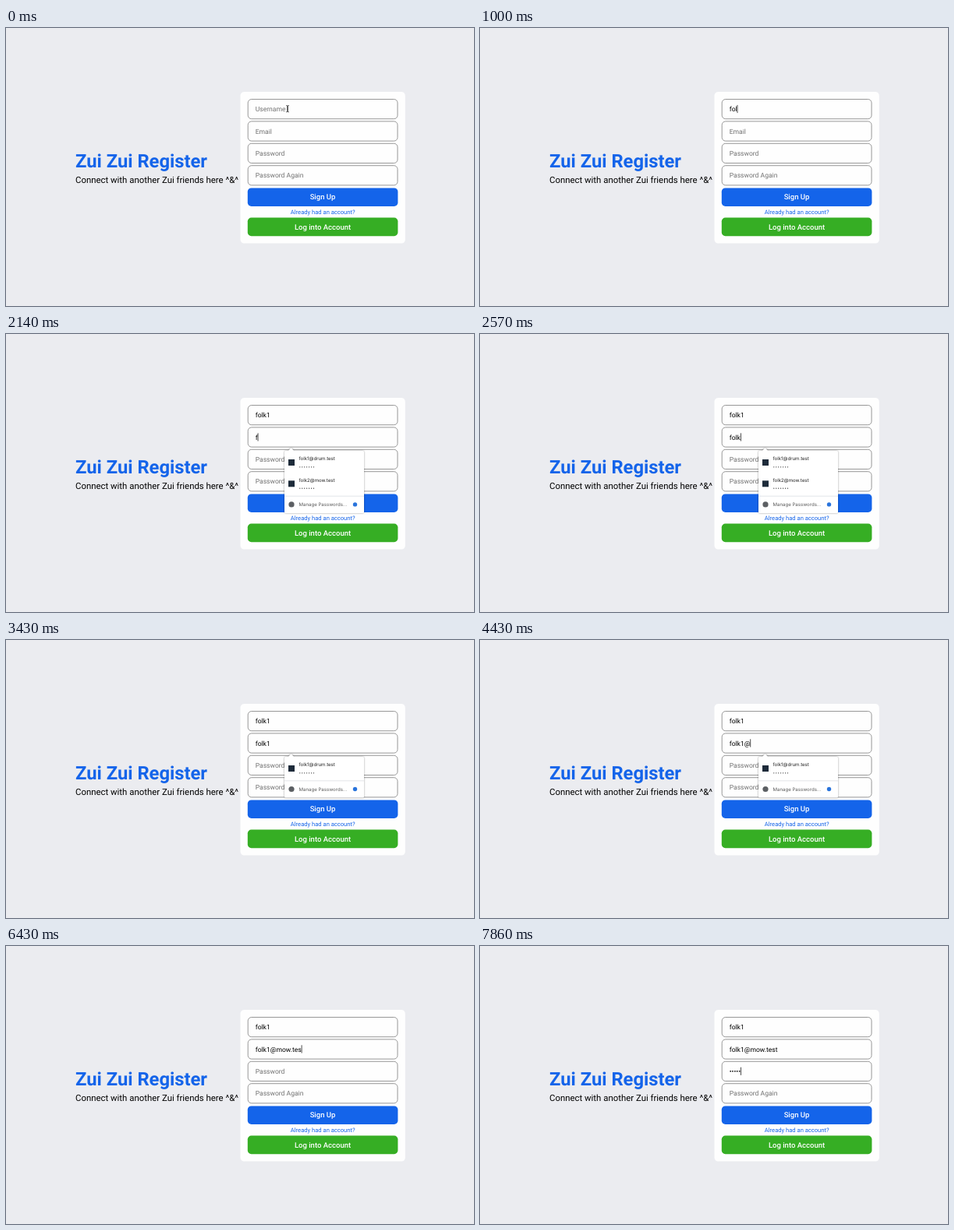
An HTML page that plays this animation: 600 px wide and 357 px high, repeating every 8 s.

```html
<!DOCTYPE html>
<html lang="en">
<head>
<meta charset="utf-8">
<title>Register form</title>
<style>
  html, body { margin: 0; width: 100%; height: 100%; overflow: hidden; background: #ebecf0; }
  svg { display: block; width: 100%; height: 100%; }
  text { font-family: Roboto, sans-serif; text-rendering: geometricPrecision; white-space: pre; }
  .title { font-size: 23.75px; font-weight: 700; fill: #1464ea; }
  .tagline { font-size: 11.4px; }
  .box { fill: #fefefe; stroke: #929292; stroke-width: .95; }
  .value { font-size: 8.55px; fill: #000; }
  .value.hint { fill: #707070; }
  .button { font-size: 9.5px; font-weight: 500; fill: #fff; text-anchor: middle; }
  .link { font-size: 7.6px; fill: #1464ea; text-anchor: middle; }
  #popup text { font-family: Inter, sans-serif; font-size: 6.1px; fill: #222; }
  #popup text.manage { fill: #5a5a5a; }
  #panel { filter: drop-shadow(0 .8px 1.3px rgba(0, 0, 0, .4)); }
  .dots { stroke: #333; stroke-width: 1.3; stroke-linecap: round; stroke-dasharray: 0 2.95; }
</style>
</head>
<body>
<svg viewBox="0 0 600 357">
  <rect width="600" height="357" fill="#ebecf0"/>
  <text class="title" x="89" y="178.6">Zui Zui Register</text>
  <text class="tagline" x="89" y="199.2">Connect with another Zui friends here ^&amp;^</text>

  <rect x="300.5" y="82" width="211.3" height="194.6" rx="4.75" fill="#fefefe"/>
  <g id="fields"></g>

  <rect x="309.8" y="205.4" width="192.6" height="23.6" rx="4.75" fill="#1464ea"/>
  <text class="button" x="406" y="220.4">Sign Up</text>
  <text class="link" x="406.2" y="239">Already had an account?</text>
  <rect x="309.8" y="243.6" width="192.6" height="23.6" rx="4.75" fill="#36ae24"/>
  <text class="button" x="406" y="258.8">Log into Account</text>

  <rect id="caret" width=".7" height="10.2" fill="#000"/>
  <path id="pointer" d="M359.3 99.5q1.7 0 1.7 1.2v6q0 1.2-1.7 1.2M362.7 99.5q-1.7 0-1.7 1.2v6q0 1.2 1.7 1.2"
        fill="none" stroke="#222" stroke-width=".9"/>

  <g id="popup">
    <g id="panel" fill="#fff">
      <rect id="sheet" x="357" y="150" width="102" rx="1.5"/>
      <path d="M361.5 150.3l4-4 4 4z"/>
    </g>
    <g id="first">
      <rect x="362" y="161" width="8" height="8" fill="#1d2b3a"/>
      <text x="375.5" y="162.2">folk1@drum.test</text>
      <path class="dots" d="M376.8 170.8h17.9"/>
    </g>
    <g id="second">
      <rect x="362" y="188.3" width="8" height="8" fill="#1d2b3a"/>
      <text x="375.5" y="189.7">folk2@mow.test</text>
      <path class="dots" d="M376.8 198.2h17.9"/>
    </g>
    <g id="footer">
      <path d="M357 180.8h102" stroke="#dcdfe5" stroke-width=".8"/>
      <circle cx="366" cy="191.5" r="3.6" fill="#5c5f63"/>
      <text class="manage" x="375.5" y="193.7">Manage Passwords...</text>
      <circle cx="447.5" cy="191.5" r="2.7" fill="#2a74dc"/>
    </g>
  </g>
</svg>
<script>
const LOOP = 8000, ROW = 27.4, LEFT = 319.7;
const $ = id => document.getElementById(id);
const show = (node, on) => node.setAttribute('visibility', on ? 'inherit' : 'hidden');

// focus: when the field gains the caret; keys: when each character arrives
const fields = [
  { hint: 'Username', text: 'folk1', focus: 280, keys: [700, 850, 990, 1130, 1420] },
  { hint: 'Email', text: 'folk1@mow.test', focus: 1850,
    keys: [2130, 2280, 2420, 2560, 2700, 4130, 4990, 5280, 5420, 5700, 5990, 6130, 6420, 6570] },
  { hint: 'Password', text: '•••••', focus: 6850, keys: [7130, 7280, 7420, 7560, 7700] },
  { hint: 'Password Again', text: '', focus: Infinity, keys: [] }
];
const [popupOpen, popupNarrow, popupClose] = [0, 4, 6].map(i => fields[1].keys[i]);

function make(tag, attrs) {
  const node = document.createElementNS('http://www.w3.org/2000/svg', tag);
  for (const name in attrs) node.setAttribute(name, attrs[name]);
  return $('fields').appendChild(node);
}

fields.forEach((field, i) => {
  field.y = 104.1 + i * 28.4;
  make('rect', { class: 'box', x: 310.2, y: field.y - 12.6, width: 191.8, height: 25.2, rx: 4.6 });
  field.label = make('text', { x: LEFT, y: field.y + 3 });
});

function drawFields(t) {
  for (const field of fields) {
    const count = field.keys.filter(k => k <= t).length;
    field.typed = field.text.slice(0, count);
    field.label.textContent = field.typed || field.hint;
    field.label.setAttribute('class', count ? 'value' : 'value hint');
  }
}

function drawCaret(t) {
  const active = fields.filter(f => f.focus <= t).pop();
  if (!active) return show($('caret'), false);
  const lastAction = Math.max(active.focus, ...active.keys.filter(k => k <= t));
  const width = active.typed ? active.label.getComputedTextLength() : 0;
  $('caret').setAttribute('x', LEFT + width);
  $('caret').setAttribute('y', active.y - 5.2);
  show($('caret'), (t - lastAction) % 1000 < 500);
}

function drawPopup(t) {
  const both = t < popupNarrow;
  show($('popup'), t >= popupOpen && t < popupClose);
  show($('second'), both);
  $('sheet').setAttribute('height', 52.5 + (both ? ROW : 0));
  $('footer').setAttribute('transform', `translate(0 ${both ? ROW : 0})`);
}

function draw(now) {
  const t = now % LOOP;
  drawFields(t);
  drawCaret(t);
  drawPopup(t);
  show($('pointer'), t < fields[0].keys[0]);
}

let start;
function tick(now) {
  start ??= now;
  draw(now - start);
  requestAnimationFrame(tick);
}
draw(0);
requestAnimationFrame(tick);
</script>
</body>
</html>
```
